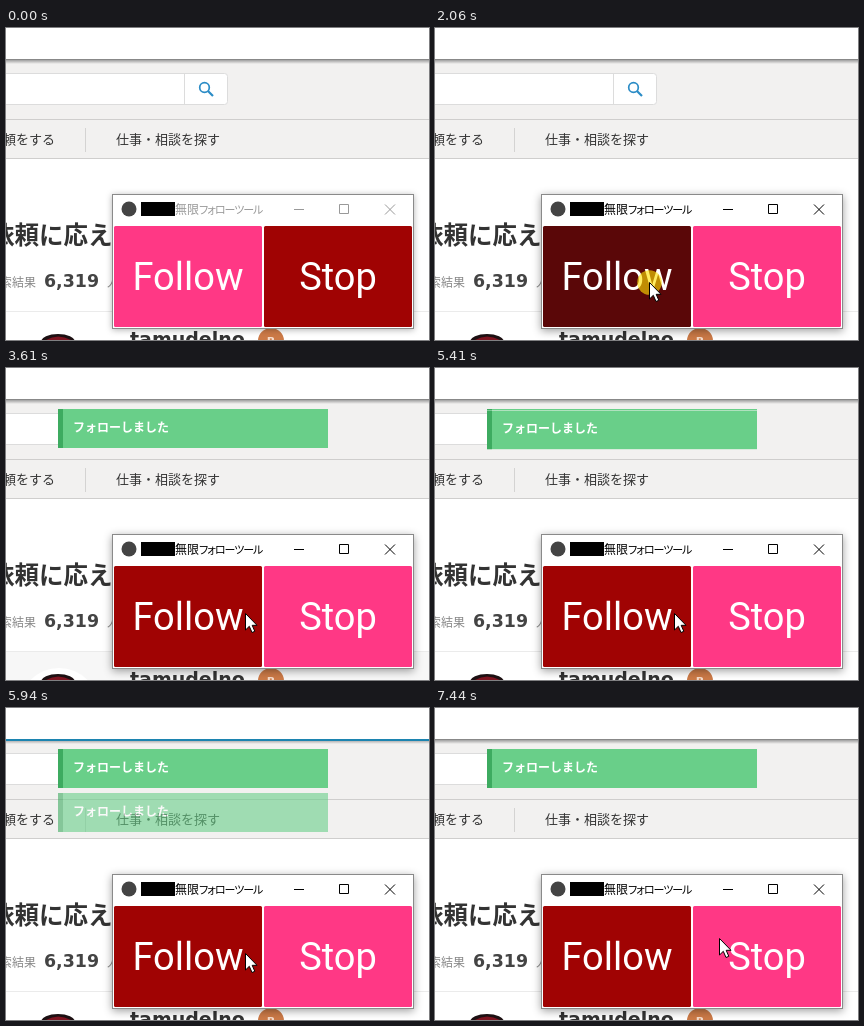
Recreate the animation shown at these times as an HTML page. Size 423 px wide and 312 px high, loop 8 s.

```html
<!DOCTYPE html>
<html lang="ja">
<head>
<meta charset="utf-8">
<title>Follow tool</title>
<style>
html, body { margin: 0; width: 100%; height: 100%; overflow: hidden; background: #fff; }
svg { display: block; }
text { font-family: "Noto Sans CJK JP", "Noto Sans CJK", sans-serif; font-size: 13px; fill: #333; white-space: pre; }
.bold { font-weight: 700; }
.latin { font-family: "DejaVu Sans", sans-serif; font-weight: 700; }
.button { font-family: Roboto, sans-serif; font-size: 38px; fill: #fff; text-anchor: middle; }
.notice { font-size: 12px; font-weight: 700; fill: #fff; }
.kana { font-size: 11px; letter-spacing: -1px; font-feature-settings: "palt"; }
#win { filter: drop-shadow(0 2px 4px rgba(0, 0, 0, .38)); }
</style>
</head>
<body>
<svg width="423" height="312" viewBox="0 0 423 312">
  <defs>
    <linearGradient id="shade" x2="0" y2="1">
      <stop stop-color="#777"/>
      <stop offset=".3" stop-color="#aaa"/>
      <stop offset="1" stop-color="#f2f1f0"/>
    </linearGradient>
    <g id="toast">
      <rect width="270" height="39" fill="#69cf89"/>
      <rect width="5" height="39" fill="#3dab60"/>
    </g>
  </defs>

  <!-- page -->
  <rect width="423" height="312" fill="#fff"/>
  <rect y="31" width="423" height="100" fill="#f2f1f0"/>
  <rect y="31" width="423" height="5" fill="url(#shade)"/>
  <path d="M-5 45.5H218.500a3 3 0 0 1 3 3V73.500a3 3 0 0 1 -3 3H-5Z M178.500 45.500V76.500" fill="#fff" stroke="#dcdcdc"/>
  <g fill="none" stroke="#2b8cc6" stroke-width="1.7">
    <circle cx="198.500" cy="59.500" r="4.800"/>
    <path d="M202 63L207 68" stroke-width="2.200"/>
  </g>
  <path d="M0 91.500H423M0 130.500H423" stroke="#cfcecd"/>
  <path d="M79.500 100V124" stroke="#d4d3d2"/>
  <text x="-3" y="116">頼をする</text>
  <text x="110" y="116">仕事・相談を探す</text>
  <text class="bold" x="-16" y="216" font-size="24" style="font-size:24.5px">依頼に応え</text>
  <text x="-6" y="259" style="font-size:12px;fill:#888">索結果</text>
  <text class="latin" x="38" y="259" style="font-size:17.4px;fill:#444">6,319</text>
  <text x="101" y="259" style="font-size:12px;fill:#888">人</text>
  <g id="hover">
    <rect y="283" width="423" height="29" fill="#f7f7f7"/>
    <circle cx="53" cy="340" r="40" fill="#fff"/>
  </g>
  <path d="M0 283.500H423" stroke="#ebebeb"/>
  <ellipse cx="52" cy="314" rx="17" ry="8" fill="#1c1012"/>
  <path d="M40 312Q52 305 65 312Z" fill="#7d1420"/>
  <text class="latin" x="124" y="318" style="font-size:19px">tamudelno</text>
  <circle cx="265" cy="313" r="13" fill="#cc7a47"/>
  <text class="latin" x="265" y="317" text-anchor="middle" style="font-size:11px;fill:#f6dccb">B</text>

  <rect id="bar" y="31" height="2" fill="#1c84b0"/>
  <svg id="old" x="52" width="270">
    <use href="#toast"/><text class="notice" x="15" y="23">フォローしました</text>
  </svg>
  <svg id="new" x="52" y="41" width="270">
    <use href="#toast"/><text class="notice" x="15" y="23">フォローしました</text>
  </svg>

  <!-- tool window -->
  <g id="win">
    <rect x="106.500" y="166.500" width="301" height="134" fill="#fff" stroke="#8a8a8a"/>
    <circle cx="123" cy="181" r="7.500" fill="#444"/>
    <rect x="135" y="174" width="34" height="14"/>
    <text id="title" x="169" y="185.500" style="font-size:12px">無限<tspan class="kana">フォローツール</tspan></text>
    <path id="controls" d="M288 181.500H298M333.500 176.500H342.500V185.500H333.500ZM379 176.500L389 186.500M389 176.500L379 186.500" fill="none"/>
    <rect id="follow" x="108" y="198" width="148" height="101" rx="1.500"/>
    <rect id="stop" x="258" y="198" width="148" height="101" rx="1.500"/>
    <text class="button" x="182" y="262">Follow</text>
    <text class="button" x="332" y="262">Stop</text>
  </g>

  <g id="cursor">
    <circle id="click" cx=".5" cy=".5" r="12.300" fill="#ffe000" opacity=".62"/>
    <path d="M.5 .5V17L4.300 13.300L7 19.500L9.800 18.300L7.200 12.300H12Z" fill="#fff" stroke="#000"/>
  </g>
</svg>
<script>
const LOOP = 8000, PINK = "#ff3885", RED = "#a00303", PRESSED = "#5a0708";
const $ = id => document.getElementById(id);
const set = (id, attrs) => { for (const k in attrs) $(id).setAttribute(k, attrs[k]); };
const show = (id, on) => set(id, { visibility: on ? "visible" : "hidden" });
const ramp = (t, start, length) => Math.min(1, Math.max(0, (t - start) / length));
const swing = (t, start, length) => .5 - Math.cos(Math.PI * ramp(t, start, length)) / 2;
const within = (t, a, b) => t >= a && t < b;

// pointer path: time, x, y
const path = [
  [70, 89, 306], [360, 208, 259], [1700, 208, 259], [1760, 214, 261],
  [1850, 214, 261], [1910, 214, 254], [2230, 214, 254], [2450, 218, 250],
  [2920, 218, 250], [3390, 235, 247], [3480, 235, 247], [3610, 239, 245],
  [6350, 239, 245], [6980, 279, 232], [7120, 282, 231], [7380, 282, 231], [7440, 284, 230]
];
function pointer(t) {
  const i = path.findIndex(p => p[0] > t);
  if (i < 0) return path[path.length - 1].slice(1);
  const b = path[i], a = path[Math.max(0, i - 1)];
  const k = ramp(t, a[0], b[0] - a[0] || 1);
  return [1, 2].map(n => Math.round(a[n] + (b[n] - a[n]) * k));
}

function draw(t) {
  const focused = t >= 400, ink = focused ? "#000" : "#999";
  $("title").style.fill = ink;
  set("controls", { stroke: ink });
  $("win").style.filter = focused ? "" : "drop-shadow(0 1px 3px rgba(0,0,0,.3))";
  set("follow", { fill: t < 2060 ? PINK : t < 2230 ? PRESSED : RED });
  set("stop", { fill: t < 2060 ? RED : PINK });

  show("hover", within(t, 2300, 5410));
  const second = t >= 5400;
  const grow = second ? ramp(t, 5450, 400) : ramp(t, 2230, 270);
  const fade = second ? ramp(t, 6180, 350) : ramp(t, 2880, 300);
  set("bar", { width: 423 * grow, opacity: 1 - fade });

  const first = swing(t, 2215, 300), next = swing(t, 5377, 300);
  set("old", { y: 41 + 44 * next, height: 39 * first, opacity: 1 - swing(t, 5810, 300) });
  set("new", { height: 39 * next });
  show("old", first > 0);
  show("new", next > 0);

  show("cursor", t >= 70);
  set("cursor", { transform: `translate(${pointer(t)})` });
  set("click", { opacity: within(t, 360, 600) || within(t, 2060, 2230) ? .62 : 0 });
}

const begin = performance.now();
function frame() {
  draw((performance.now() - begin) % LOOP);
  requestAnimationFrame(frame);
}
frame();
</script>
</body>
</html>
```
